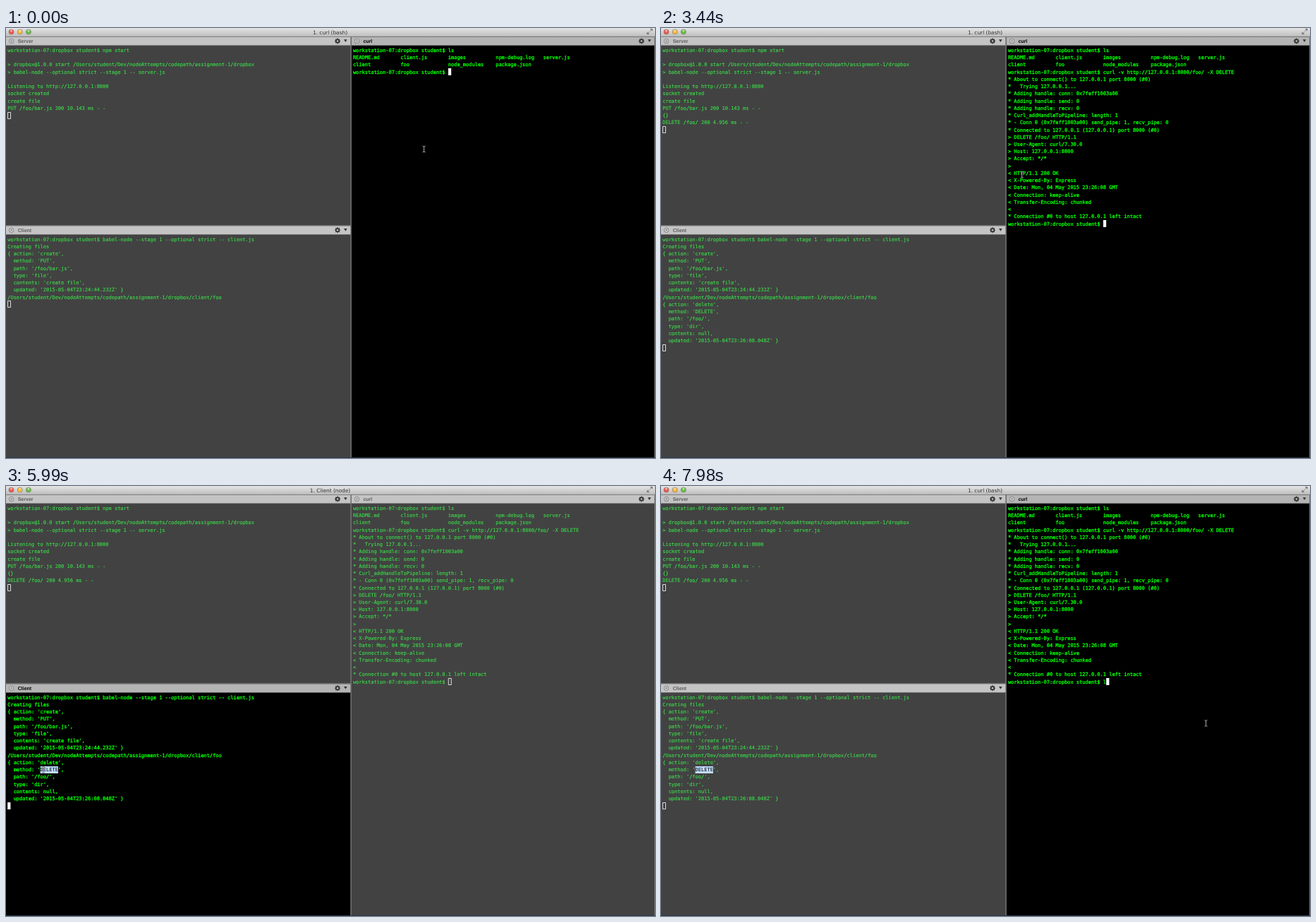
Animation, 920 px wide and 609 px high, one loop 8 s. Source, as an HTML page with a canvas:

```html
<!DOCTYPE html>
<html lang="en">
<head>
<meta charset="utf-8">
<title>Terminal session</title>
<style>
  html, body { margin: 0; width: 100%; height: 100%; overflow: hidden; background: #424242; }
  canvas { display: block; }
</style>
</head>
<body>
<canvas id="stage" width="920" height="609"></canvas>
<script>
const ctx = document.getElementById('stage').getContext('2d');
const LOOP = 8000, COL = 4.219, ROW = 10.23;
const MONO = '7.008px "DejaVu Sans Mono", monospace';
const PROMPT = 'workstation-07:dropbox student$ ';
const HOME = '/Users/student/Dev/nodeAttempts/codepath/assignment-1/dropbox';
const COMMAND = 'curl -v http://127.0.0.1:8000/foo/ -X DELETE';

const serverStart = `${PROMPT}npm start

> dropbox@1.0.0 start ${HOME}
> babel-node --optional strict --stage 1 -- server.js

Listening to http://127.0.0.1:8000
socket created
create file
PUT /foo/bar.js 200 10.143 ms - -
`;
const serverDelete = `{}
DELETE /foo/ 200 4.956 ms - -
`;
const clientStart = `${PROMPT}babel-node --stage 1 --optional strict -- client.js
Creating files
{ action: 'create',
  method: 'PUT',
  path: '/foo/bar.js',
  type: 'file',
  contents: 'create file',
  updated: '2015-05-04T23:24:44.232Z' }
${HOME}/client/foo
`;
const clientDelete = `{ action: 'delete',
  method: 'DELETE',
  path: '/foo/',
  type: 'dir',
  contents: null,
  updated: '2015-05-04T23:26:08.048Z' }
`;
const columns = (...names) => names.map(n => n.padEnd(16)).join('').trimEnd();
const shellStart = `${PROMPT}ls
${columns('README.md', 'client.js', 'images', 'npm-debug.log', 'server.js')}
${columns('client', 'foo', 'node_modules', 'package.json')}
${PROMPT}`;
const shellReply = `
* About to connect() to 127.0.0.1 port 8000 (#0)
*   Trying 127.0.0.1...
* Adding handle: conn: 0x7feff1003a00
* Adding handle: send: 0
* Adding handle: recv: 0
* Curl_addHandleToPipeline: length: 1
* - Conn 0 (0x7feff1003a00) send_pipe: 1, recv_pipe: 0
* Connected to 127.0.0.1 (127.0.0.1) port 8000 (#0)
> DELETE /foo/ HTTP/1.1
> User-Agent: curl/7.30.0
> Host: 127.0.0.1:8000
> Accept: */*
>
< HTTP/1.1 200 OK
< X-Powered-By: Express
< Date: Mon, 04 May 2015 23:26:08 GMT
< Connection: keep-alive
< Transfer-Encoding: chunked
<
* Connection #0 to host 127.0.0.1 left intact
${PROMPT}`;

// Pointer moves: first step, last step, number of steps, end point
const pointerMoves = [
  [3290, 4330, 8, 75.5, 404],
  [4480, 4630, 2, 49, 425],
  [4780, 4780, 1, 50.5, 417],
  [5220, 5540, 3, 46, 412],
  [5840, 5840, 1, 43, 406],
  [5990, 5990, 1, 53, 402],
  [6290, 6870, 5, 772.5, 336]
];

function pointerAt(t) {
  let x = 592.5, y = 171.5;
  for (const [first, last, steps, endX, endY] of pointerMoves) {
    if (t < first) break;
    const gap = (last - first) / (steps - 1) || 1;
    const p = Math.min(1, (Math.floor((t - first) / gap + 1e-6) + 1) / steps);
    const eased = p * p * (3 - 2 * p);
    x += (endX - x) * eased;
    y += (endY - y) * eased;
  }
  return [x, y];
}

function rect(color, x, y, w, h) {
  ctx.fillStyle = color;
  ctx.fillRect(x, y, w, h);
}

function disc(color, x, y, r) {
  ctx.fillStyle = color;
  ctx.beginPath();
  ctx.arc(x, y, r, 0, Math.PI * 2);
  ctx.fill();
}

function label(text, x, y, font, color, align = 'left') {
  ctx.font = font;
  ctx.fillStyle = color;
  ctx.textAlign = align;
  ctx.fillText(text, x, y);
}

// Terminal text, thickened a little by an outline
function termText(text, x, y, color, weight) {
  label(text, x, y, MONO, color);
  ctx.strokeStyle = color;
  ctx.lineWidth = weight;
  ctx.strokeText(text, x, y);
}

function lines(color, width, ...segments) {
  ctx.strokeStyle = color;
  ctx.lineWidth = width;
  ctx.beginPath();
  for (const [x1, y1, x2, y2] of segments) {
    ctx.moveTo(x1, y1);
    ctx.lineTo(x2, y2);
  }
  ctx.stroke();
}

function gear(x, y) {
  const spokes = [0, 1, 2, 3].map(i => {
    const dx = 4 * Math.cos(i * Math.PI / 4), dy = 4 * Math.sin(i * Math.PI / 4);
    return [x - dx, y - dy, x + dx, y + dy];
  });
  lines('#333', 1.3, ...spokes);
  disc('#333', x, y, 3);
  disc('#c4c4c4', x, y, 1.3);
}

function paneBar(name, x, y, w, active) {
  rect(active ? '#b4b4b4' : '#c4c4c4', x, y, w, 12);
  rect('#858585', x, y + 12, w, 0.6);
  const cx = x + 7.7, cy = y + 6;
  disc('#777', cx, cy, 3.5);
  disc('#d2d2d2', cx, cy, 2.8);
  lines('#666', 0.8, [cx - 1.4, cy - 1.4, cx + 1.4, cy + 1.4], [cx - 1.4, cy + 1.4, cx + 1.4, cy - 1.4]);
  label(name, x + 16.7, y + 8.5, 'bold 7px "Liberation Sans", sans-serif', active ? '#000' : '#5c5c5c');
  gear(x + w - 18.5, y + 6);
  const tx = x + w - 7.2;
  ctx.fillStyle = '#333';
  ctx.beginPath();
  ctx.moveTo(tx - 2.3, y + 3.7);
  ctx.lineTo(tx + 2.3, y + 3.7);
  ctx.lineTo(tx, y + 7.5);
  ctx.fill();
}

function pane({ name, x, y, w, h, text, active, selection }) {
  rect(active ? '#000' : '#424242', x, y, w, h);
  paneBar(name, x, y, w, active);
  const left = x + 2.2, base = y + 21.5;
  const rows = text.split('\n');
  const color = active ? '#00ff00' : '#3cd84a';
  const weight = active ? 0.35 : 0.15;
  rows.forEach((row, i) => termText(row, left, base + i * ROW, color, weight));

  if (selection) {
    const [row, from, to] = selection;
    const sx = left + from * COL, sy = base + row * ROW;
    rect('#c1dcff', sx, Math.round(sy - 7.5), (to - from) * COL, 10);
    label(rows[row].slice(from, to), sx, sy, MONO, '#000');
  }

  const last = rows.length - 1;
  const cx = left + rows[last].length * COL;
  const cy = Math.round(base + last * ROW - 7.5);
  if (active) {
    rect('#fff', cx, cy, COL, 10);
  } else {
    ctx.strokeStyle = '#f0f0f0';
    ctx.lineWidth = 0.9;
    ctx.strokeRect(cx + 0.3, cy + 0.5, COL - 0.2, 9);
  }
}

function windowBar(title) {
  const shade = ctx.createLinearGradient(0, 0, 0, 12);
  shade.addColorStop(0, '#e4e4e4');
  shade.addColorStop(1, '#bebebe');
  rect(shade, 0, 0, 920, 12);
  rect('#858585', 0, 11.8, 920, 0.7);
  ['#ee5a50', '#f5b63c', '#69bd45'].forEach((color, i) => {
    const x = 7.5 + i * 12.2;
    disc('#777', x, 5.5, 3.8);
    disc(color, x, 5.5, 3.3);
    disc('#ffffff99', x, 4, 1.4);
  });
  label(title, 459.5, 8.5, '7.4px "DejaVu Sans", sans-serif', '#333', 'center');
  lines('#666', 1, [909, 8.5, 912, 5.5], [909, 5.8, 909, 8.5], [909, 8.5, 911.7, 8.5],
    [913, 4.5, 916, 1.5], [913.3, 1.5, 916, 1.5], [916, 1.5, 916, 4.2]);
}

function pointer(x, y) {
  const beam = [[x, y - 3.6, x, y + 3.6]];
  for (const side of [-1, 1]) {
    beam.push([x - 2, y + side * 4.4, x, y + side * 3.6], [x, y + side * 3.6, x + 2, y + side * 4.4]);
  }
  lines('#0007', 2, ...beam);
  lines('#d4d4d4', 0.8, ...beam);
}

function typed(t) {
  if (t < 300) return '';
  if (t < 445) return 'ls';
  return COMMAND;
}

function draw(t) {
  const replied = t >= 1940;
  const clientFocus = t >= 5070 && t < 7020;
  ctx.textRendering = 'geometricPrecision';
  ctx.lineJoin = 'round';
  rect('#424242', 0, 0, 920, 609);

  pane({ name: 'Server', x: 0, y: 12.5, w: 488.5, h: 267,
    text: serverStart + (replied ? serverDelete : ''), active: false });
  pane({ name: 'Client', x: 0, y: 280.3, w: 488.5, h: 328,
    text: clientStart + (replied ? clientDelete : ''), active: clientFocus,
    selection: t >= 5990 && [10, 11, 17] });
  pane({ name: 'curl', x: 489.7, y: 12.5, w: 429.6, h: 595.5,
    text: shellStart + typed(t) + (replied ? shellReply : '') + (t >= 7980 ? 'l' : ''),
    active: !clientFocus });

  rect('#8c8c8c', 488.5, 12.5, 1, 595.5);
  rect('#858585', 0, 279.4, 488.5, 0.8);
  rect('#777', 919.2, 12, 0.8, 597);
  rect('#26384a', 0, 608, 920, 1);
  windowBar(t >= 5070 && t < 7170 ? '1. Client (node)' : '1. curl (bash)');
  if (t < 300 || replied) pointer(...pointerAt(t));
}

function tick() {
  draw(performance.now() % LOOP);
  requestAnimationFrame(tick);
}
tick();
</script>
</body>
</html>
```
